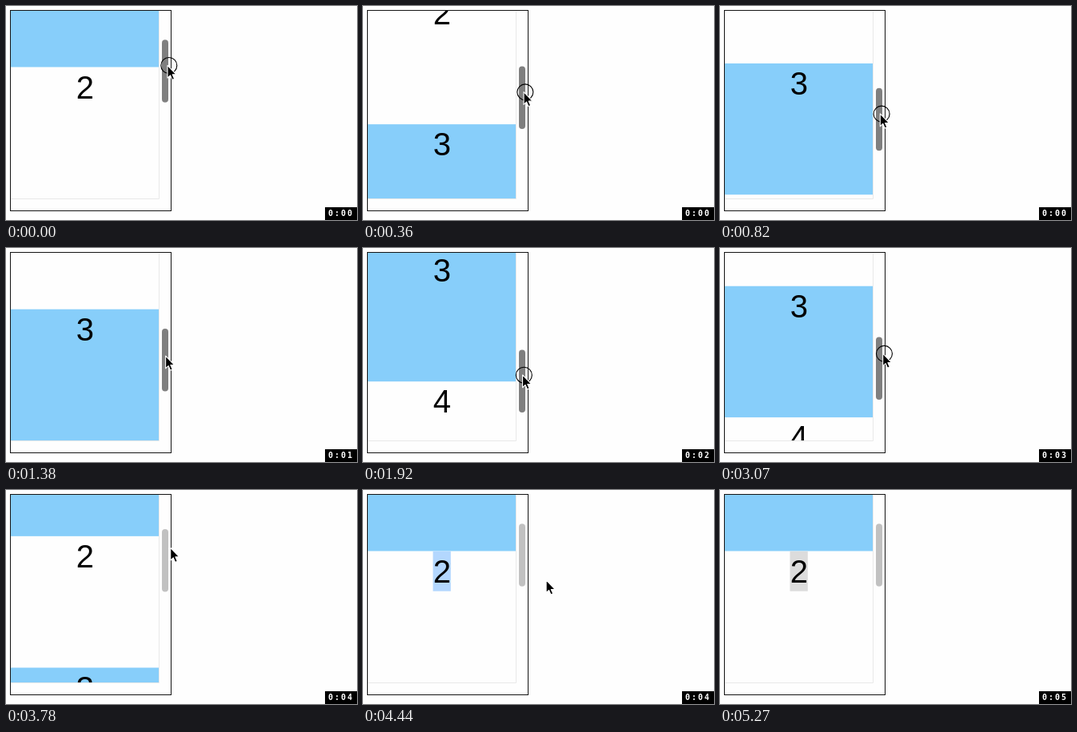
Write an HTML page that moves like this. It is 439x268 px and loops after 5.29 s.

```html
<!DOCTYPE html>
<html lang="en">
<head>
<meta charset="utf-8">
<title>Scroll snap demo</title>
<style>
  html, body { margin: 0; width: 100%; height: 100%; overflow: hidden; background: #fefefe; }
  svg { display: block; width: 439px; height: 268px; }
  .digit { font: 40px "Liberation Sans", Arial, sans-serif; text-anchor: middle; }
  .clock { font: bold 10px "DejaVu Sans Mono", monospace; letter-spacing: 2px; fill: #fff; }
</style>
</head>
<body>
<svg viewBox="0 0 439 268" xmlns="http://www.w3.org/2000/svg">
  <defs>
    <clipPath id="view"><rect x="6" y="6" width="185" height="235"/></clipPath>
  </defs>
  <path d="M191.5 6V241.5H6" fill="none" stroke="#e9e9e9"/>
  <g clip-path="url(#view)"><g id="content"></g></g>
  <rect id="thumb" x="195" width="8" height="78.5" rx="4"/>
  <rect x="5.5" y="5.5" width="201" height="251" fill="none" stroke="#141414"/>
  <g id="cursor">
    <circle id="ring" r="10" fill="none" stroke="#000" stroke-width="1.1"/>
    <path d="M-1.8 -.2V15.6L1.7 12.3L4.1 17.9L6.8 16.7L4.4 11.3H9.2Z" stroke="#fff" stroke-width="1.1" stroke-linejoin="round"/>
  </g>
  <rect x="399" y="252" width="40" height="16"/>
  <text id="clock" class="clock" x="403" y="263"></text>
</svg>
<script>
const LOOP = 5290;
const TOP = 6.7, PANEL = 164.6;
const THUMB_RATIO = .358;
const SNAP_TIME = 200;
const SELECT = 4430, BLUR = 5270;
const $ = id => document.getElementById(id);

const smooth = u => u * u * (3 - 2 * u);
const easeOut = power => u => 1 - (1 - u) ** power;

// Panel n rests with its bottom edge on the bottom of the view
const restAt = n => (n - 2) * 2 * PANEL / 2 + 94.6;

// Each drag ends at scroll position `to`; after `up` the view snaps to a panel
const drags = [
  { down: 0, from: 30, until: 1020, up: 1160, to: 274, panel: 3, x: -1.8, ease: easeOut(1.8) },
  { down: 1740, from: 1740, until: 2330, up: 2330, to: 370, panel: 4, x: .5, ease: easeOut(3) },
  { down: 2700, from: 2750, until: 3440, up: 3710, to: 121, panel: 2, x: 3.7, ease: smooth }
];

// Pointer moves with no button held
const moves = [
  { from: 1160, until: 1560, x: -1, y: -6 },
  { from: 2300, until: 2480, x: 2.3, y: 8.5 },
  { from: 4170, until: 4690, x: 44, y: 76.5 },
  { from: 4720, until: 4850, x: 12, y: 142 }
];

// Turn drags into pointer moves that also scroll, each followed by a snap
let rest = restAt(2);
for (const d of drags) {
  const scroll = d.to - rest;
  rest = restAt(d.panel);
  moves.push({ ...d, scroll, y: scroll * THUMB_RATIO });
  moves.push({ from: d.up, until: d.up + SNAP_TIME, scroll: rest - d.to });
}

function total(key, start, t) {
  return moves.reduce((sum, { from, until, ease = smooth, [key]: delta = 0 }) => {
    const u = Math.min(1, Math.max(0, (t - from) / (until - from)));
    return sum + delta * ease(u);
  }, start);
}

function add(parent, tag, attrs, text = "") {
  const el = document.createElementNS("http://www.w3.org/2000/svg", tag);
  for (const k in attrs) el.setAttribute(k, attrs[k]);
  el.textContent = text;
  return parent.appendChild(el);
}

const content = $("content");
let mark;
for (let n = 0; n < 4; n++) {
  const y = n * PANEL;
  add(content, "rect", { x: 6, y, width: 185, height: PANEL, fill: n % 2 ? "#fefefe" : "#87cefa" });
  if (n === 1) mark = add(content, "rect", { x: 87.5, y, width: 22.3, height: 50 });
  add(content, "text", { class: "digit", x: 98.8, y: y + 39 }, n + 1);
}

const show = (el, on) => el.setAttribute("visibility", on ? "visible" : "hidden");

function render(t) {
  const scroll = total("scroll", restAt(2), t);
  content.setAttribute("transform", `translate(0 ${TOP - scroll})`);
  $("thumb").setAttribute("y", 8.3 + THUMB_RATIO * scroll);
  $("thumb").setAttribute("fill", t < drags[2].up ? "#7f7f7f" : "#c1c1c1");
  $("cursor").setAttribute("transform", `translate(${total("x", 203.8, t)} ${total("y", 74.5, t)})`);
  show($("ring"), drags.some(d => t >= d.down && t < d.up));
  show(mark, t >= SELECT);
  mark.setAttribute("fill", t < BLUR ? "#b3d7fe" : "#dcdcdc");
  $("clock").textContent = "0:0" + Math.floor((t + 125) / 975);
}

const start = performance.now();
function frame() {
  render((performance.now() - start) % LOOP);
  requestAnimationFrame(frame);
}
frame();
</script>
</body>
</html>
```
